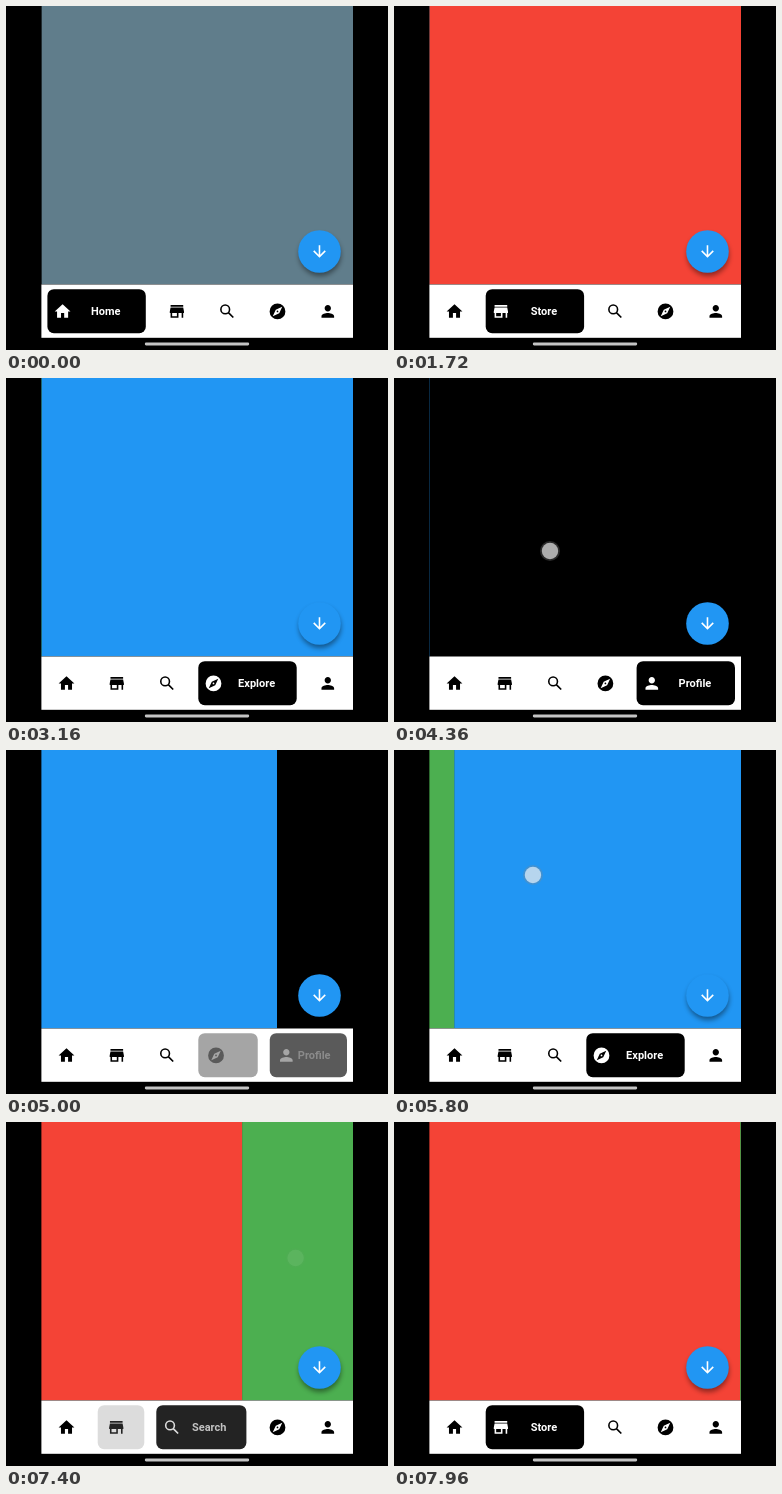
Write an HTML page that moves like this. It is 382 px wide and 344 px high and loops after 8000 ms.

```html
<!DOCTYPE html>
<html lang="en">
<head>
<meta charset="utf-8">
<title>Swipeable bottom navigation</title>
<style>
  html, body { margin: 0; width: 100%; height: 100%; overflow: hidden; background: #000; }
  svg { display: block; width: 382px; height: 344px; }
  text { font: bold 11px Roboto, Arial, sans-serif; fill: #fff; text-anchor: middle; }
</style>
</head>
<body>
<svg id="stage" viewBox="0 0 382 344">
  <defs>
    <clipPath id="screen"><rect x="35.4" width="311.6" height="278.5"/></clipPath>
    <filter id="blur" x="-50%" y="-50%" width="200%" height="200%"><feGaussianBlur stdDeviation="2.6"/></filter>
  </defs>
  <rect width="382" height="344"/>
  <g id="pages" clip-path="url(#screen)"></g>
  <g clip-path="url(#screen)">
    <circle cx="314" cy="249" r="21" fill="#000" opacity=".42" filter="url(#blur)"/>
  </g>
  <circle cx="313.5" cy="245.5" r="21.3" fill="#2196f3"/>
  <path fill="#fff" transform="translate(304 236) scale(.79)"
    d="M20 12l-1.41-1.41L13 16.17V4h-2v12.17l-5.58-5.59L4 12l8 8 8-8z"/>
  <rect x="35.4" y="278.5" width="311.6" height="53.3" fill="#fff"/>
  <g id="nav"></g>
  <rect x="138.8" y="336.6" width="104.4" height="2.8" rx="1.4" fill="#c4c4c4"/>
  <g id="touch">
    <circle r="10" fill="#888" opacity=".3"/>
    <circle r="8.2" fill="#fff" opacity=".62"/>
  </g>
</svg>
<script>
const LOOP = 8000, STEP = 40;
const LEFT = 35.4, WIDTH = 311.6, SLOT = 50.3, GROW = WIDTH - 5 * SLOT;
const ICON_Y = 305.4, ICON_SCALE = 0.79;

const tabs = [
  { name: 'Home', color: '#607d8b', icon: 'M10 20v-6h4v6h5v-8h3L12 3 2 12h3v8z' },
  { name: 'Store', color: '#f44336',
    icon: 'M20 4H4v2h16V4zm1 10v-2l-1-5H4l-1 5v2h1v6h10v-6h4v6h2v-6h1zm-9 4H6v-4h6v4z' },
  { name: 'Search', color: '#4caf50',
    icon: 'M9.5 3a6.5 6.5 0 1 0 0 13a6.5 6.5 0 1 0 0-13zm0 2a4.5 4.5 0 1 1 0 9a4.5 4.5 0 1 1 0-9z' +
      'M13.1 14.6L19 20.5l1.5-1.5-5.9-5.9z' },
  { name: 'Explore', color: '#2196f3',
    icon: 'M12 2a10 10 0 1 0 0 20a10 10 0 1 0 0-20zM14.19 14.19L6 18l3.81-8.19L18 6z' +
      'M12 10.9a1.1 1.1 0 1 0 0 2.2a1.1 1.1 0 1 0 0-2.2z' },
  { name: 'Profile', color: '#000',
    icon: 'M12 12c2.21 0 4-1.79 4-4s-1.79-4-4-4-4 1.79-4 4 1.79 4 4 4zm0 2c-2.67 0-8 1.34-8 4v2h16v-2c0-2.66-5.33-4-8-4z' }
];

// Taps move one page forward, swipes one page back.
const taps = [
  { down: 920, start: 1040, end: 1520 },
  { down: 1880, start: 1960, end: 2440 },
  { down: 2640, start: 2720, end: 3160 },
  { down: 3400, start: 3480, end: 3880 }
];
const swipes = [
  { start: 4400, x: 156, y: 173 },
  { start: 5722, x: 100, y: 125 },
  { start: 6850, x: 122, y: 136 }
];
const SPEED = 320, DRAG = 480, SLOP = 14, LEAD = 40;

const clamp = v => Math.min(1, Math.max(0, v));
const ease = v => v * v * (3 - 2 * v);
const ramp = (t, from, to) => ease(clamp((t - from) / (to - from)));

function make(tag, parent, attrs) {
  const node = document.createElementNS('http://www.w3.org/2000/svg', tag);
  parent.appendChild(node);
  return set(node, attrs);
}
function set(node, attrs) {
  for (const key in attrs) node.setAttribute(key, attrs[key]);
  return node;
}

const pagesLayer = document.getElementById('pages');
const nav = document.getElementById('nav');
const touch = document.getElementById('touch');

const pages = tabs.map(tab => make('rect', pagesLayer, { width: WIDTH + 0.3, height: 278.5, fill: tab.color }));
const items = tabs.map(tab => {
  const box = make('rect', nav, { y: 283.2, height: 44, rx: 6.5 });
  const icon = make('path', nav, { d: tab.icon });
  const label = make('text', nav, { y: 309.2 });
  label.textContent = tab.name;
  return { box, icon, label };
});

// Drag at constant speed, then an overdamped spring to the page edge.
function swipeOffset(ms) {
  if (ms <= 0) return 0;
  if (ms <= DRAG) return SPEED * ms / 1000;
  const s = (ms - DRAG) / 1000, slow = 9.08, fast = 22.03;
  const gap = SPEED * DRAG / 1000 - WIDTH;
  const a = (fast * gap + SPEED) / (fast - slow);
  const rest = a * Math.exp(-slow * s) + (gap - a) * Math.exp(-fast * s);
  return rest > -0.5 ? WIDTH : WIDTH + rest;
}

function pagePosition(t) {
  const forward = taps.reduce((sum, tap) => sum + ramp(t, tap.start, tap.end), 0);
  const back = swipes.reduce((sum, s) => sum + swipeOffset(t - s.start), 0);
  return forward - back / WIDTH;
}

function navPosition(t) {
  const forward = taps.reduce((sum, tap) => sum + ramp(t, tap.start, tap.start + 300), 0);
  const back = swipes.reduce((sum, s) => sum + ramp(t, s.start + DRAG, s.start + DRAG + 300), 0);
  return forward - back;
}

function touchAt(t) {
  for (const [i, tap] of taps.entries()) {
    const age = t - tap.down;
    if (age >= 0 && age < 160) {
      return { x: LEFT + GROW + SLOT * (i + 1.5), y: 306, alpha: clamp((160 - age) / 80) };
    }
  }
  for (const s of swipes) {
    const age = t - s.start;
    if (age >= -LEAD && age < DRAG + 80) {
      const drag = SPEED * Math.min(Math.max(age, 0), DRAG) / 1000;
      return { x: s.x + SLOP * clamp((age + LEAD) / LEAD) + drag, y: s.y, alpha: clamp((DRAG + 80 - age) / 80) };
    }
  }
  return { x: 0, y: 0, alpha: 0 };
}

function draw(t) {
  const page = pagePosition(t);
  pages.forEach((rect, i) => set(rect, { x: LEFT + (i - page) * WIDTH }));

  const active = navPosition(t);
  let left = LEFT;
  items.forEach((item, i) => {
    const w = clamp(1 - Math.abs(i - active));
    const width = SLOT + GROW * w;
    const shade = Math.round(255 * w);
    const x = left + 25.1 - 3.9 * w - 12 * ICON_SCALE;
    set(item.box, { x: left + 6, width: width - 12, opacity: w });
    set(item.icon, {
      transform: `translate(${x} ${ICON_Y - 12 * ICON_SCALE}) scale(${ICON_SCALE})`,
      fill: `rgb(${shade},${shade},${shade})`
    });
    set(item.label, { x: left + 25 + 39.3 * w, opacity: clamp(w * 2 - 1) });
    left += width;
  });

  const p = touchAt(t);
  set(touch, { transform: `translate(${p.x} ${p.y})`, opacity: p.alpha });
}

const begin = performance.now();
function tick() {
  const t = (performance.now() - begin) % LOOP;
  draw(Math.floor(t / STEP) * STEP);
  requestAnimationFrame(tick);
}
tick();
</script>
</body>
</html>
```
